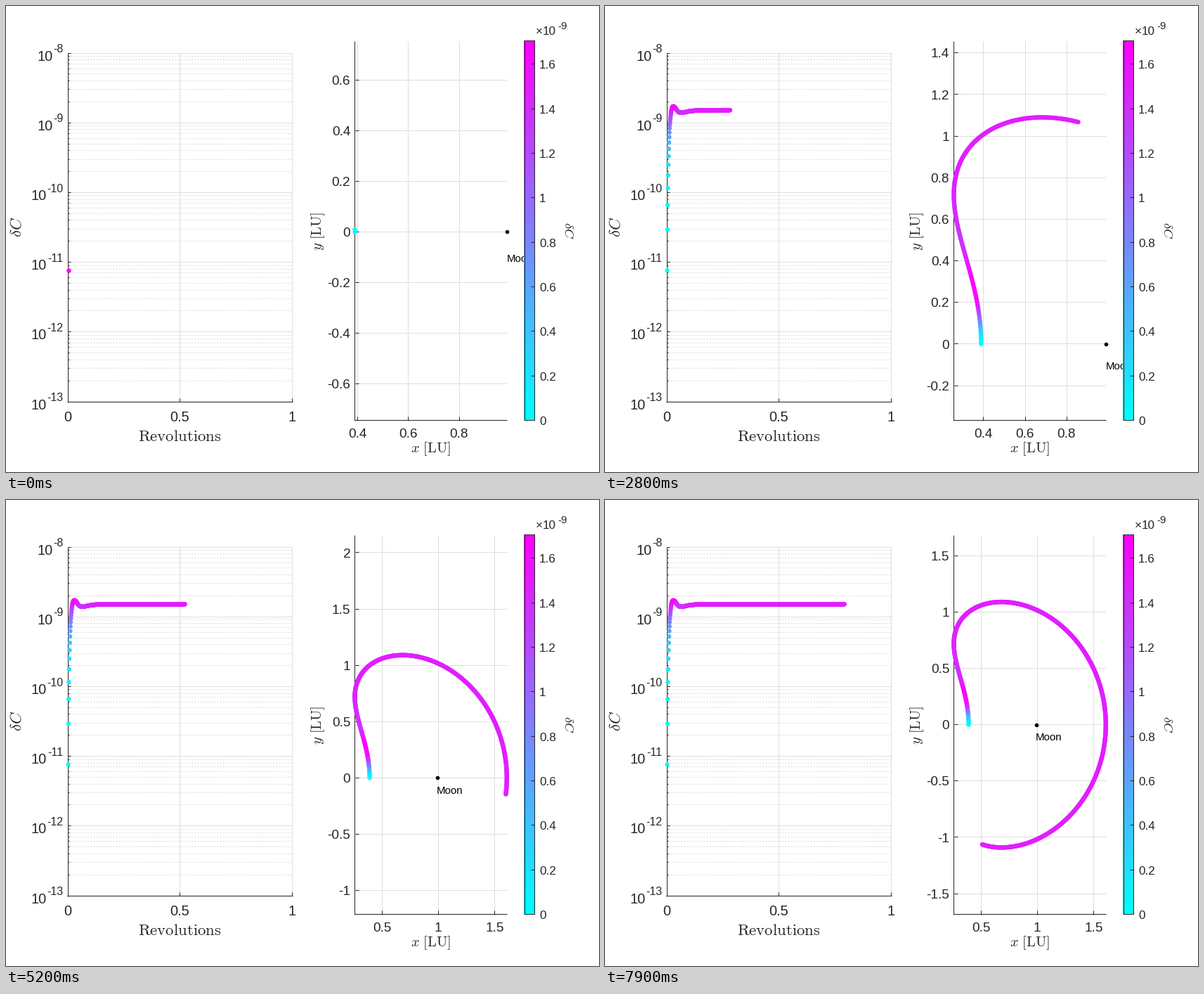
Write a matplotlib script that moves like this. It is 844 px wide and 663 px high and loops after 8000 ms.

```python
import numpy as np
import matplotlib.pyplot as plt
from matplotlib.animation import FuncAnimation
from matplotlib.collections import LineCollection
from matplotlib.patches import Rectangle

plt.rcParams["font.family"] = "Liberation Sans"
plt.rcParams["mathtext.fontset"] = "cm"

W, H, DPI = 844, 663, 72      # at 72 dpi one point is one pixel
FRAMES, PER_FRAME = 80, 10
MU = 0.01215
MOON = 1 - MU
X_START = 0.388
PEAK = 1.7056                 # largest error, in units of 1e-9
INK, GRID, MINOR = "#262626", "#dedede", "#dadada"
LEFT_FONT, RIGHT_FONT, BAR_FONT = 20, 19, 17.1

L_X0, L_X1, L_TOP, L_BOT = 88.2, 407.5, 67.0, 563.0
R_X0, R_X1, R_TOP, R_BOT = 496.5, 712.8, 50.0, 590.0


# ---- orbit: planar restricted three-body problem -------------------------

def deriv(s):
    x, y, vx, vy = s
    a = (1 - MU) / np.hypot(x + MU, y) ** 3
    b = MU / np.hypot(x - MOON, y) ** 3
    return np.array([vx, vy,
                     2 * vy + x - a * (x + MU) - b * (x - MOON),
                     -2 * vx + y - (a + b) * y])


def rk4(s, h):
    k1 = deriv(s)
    k2 = deriv(s + h / 2 * k1)
    k3 = deriv(s + h / 2 * k2)
    k4 = deriv(s + h * k3)
    return s + h / 6 * (k1 + 2 * k2 + 2 * k3 + k4)


def half_turn(v):
    """Return vx and time where the path comes back to y = 0."""
    h = 0.01
    s, t = rk4(np.array([X_START, 0, 0, v]), h), h
    while s[1] > 0 and t < 6:
        s, t = rk4(s, h), t + h
    for _ in range(3):
        dt = np.clip(-s[1] / s[3], -h, h)
        s, t = rk4(s, dt), t + dt
    return s[2], t


def periodic_start():
    """Secant search for the speed that closes the orbit."""
    v0, v1 = 1.58, 1.60
    f0, f1 = half_turn(v0)[0], half_turn(v1)[0]
    for _ in range(14):
        if abs(f1) < 1e-9 or f1 == f0:
            break
        step = np.clip(-f1 * (v1 - v0) / (f1 - f0), -0.03, 0.03)
        v0, f0, v1 = v1, f1, v1 + step
        f1 = half_turn(v1)[0]
    return v1, 2 * half_turn(v1)[1]


def orbit(count):
    v, period = periodic_start()
    s = np.array([X_START, 0, 0, v])
    path = [s[:2]]
    for _ in range(count - 1):
        s = rk4(s, period / 1000)
        path.append(s[:2])
    return np.array(path)


# ---- error curve ----------------------------------------------------------

def hermite(t, knots, vals):
    m = np.gradient(vals, knots, edge_order=2)
    i = np.clip(np.searchsorted(knots, t, side="right") - 1, 0, len(knots) - 2)
    h = knots[i + 1] - knots[i]
    u = (t - knots[i]) / h
    return ((1 + 2 * u) * (1 - u) ** 2 * vals[i] + u * (1 - u) ** 2 * h * m[i]
            + u * u * (3 - 2 * u) * vals[i + 1] + u * u * (u - 1) * h * m[i + 1])


KNOTS = np.array([0, 2, 4, 7, 10, 14, 18, 22, 25, 28, 32, 36, 44, 53, 62, 72,
                  81, 100, 125, 160, 200, 240, 1000], float)
LEVELS = np.array([0, .0292, .1147, .330, .62, 1.04, 1.385, 1.61, 1.688, 1.7056,
                   1.69, 1.647, 1.508, 1.414, 1.386, 1.395,
                   1.414, 1.455, 1.485, 1.502, 1.507, 1.507, 1.507])

COUNT = PER_FRAME * (FRAMES - 1) + 2
step_no = np.arange(COUNT)
error = hermite(step_no, KNOTS, LEVELS)
path = orbit(COUNT)


def cool(t):
    t = np.clip(t, 0, 1)
    return np.column_stack([t, 1 - t, np.ones_like(t)])


def log_y(v):
    """Pixel row of an error given in units of 1e-9."""
    return L_TOP - (np.log10(v) - 1) * (L_BOT - L_TOP) / 5


# ---- stage ----------------------------------------------------------------

fig = plt.figure(figsize=((W + 1e-6) / DPI, (H + 1e-6) / DPI), dpi=DPI,
                 facecolor="white")
ax = fig.add_axes([0, 0, 1, 1])
ax.axis("off")


def hline(x0, x1, y):
    return [(x0, np.floor(y) + .5), (x1, np.floor(y) + .5)]


def vline(x, y0, y1):
    return [(np.floor(x) - .5, y0), (np.floor(x) - .5, y1)]


def strokes(segs, color, z, style="solid"):
    lines = LineCollection(segs, colors=color, linewidths=1, linestyles=style,
                           zorder=z)
    ax.add_collection(lines, autolim=False)
    return lines


def label(x, y, s, size, ha="center", z=3, color=INK, rot=0):
    return ax.text(x, y, s, size=size, ha=ha, va="baseline", color=color,
                   rotation=rot, rotation_mode="anchor", zorder=z)


def dots(size, z, **kw):
    return ax.scatter([], [], s=size ** 2, linewidths=0, zorder=z, **kw)


def left_panel():
    major, minor = [], []
    axis = [vline(L_X0, L_TOP, L_BOT + 1), hline(L_X0 - 1, L_X1, L_BOT)]
    for i, name in enumerate(("0", "0.5", "1")):
        x = L_X0 + i * (L_X1 - L_X0) / 2
        major.append(vline(x, L_TOP, L_BOT))
        axis.append(vline(x, L_BOT - 5, L_BOT))
        label(x - .4, 591, name, LEFT_FONT)
    for p in range(-13, -7):
        y = log_y(10.0 ** (p + 9))
        major.append(hline(L_X0, L_X1, y))
        axis.append(hline(L_X0, L_X0 + 4, y))
        sup = .8 * LEFT_FONT
        label(81.3, y - .8, str(p), sup, "right")
        width = sup * (.333 + .556 * len(str(-p)))
        label(80.6 - width, y + 10.5, "10", LEFT_FONT, "right")
        if p < -8:
            for m in range(2, 10):
                ym = log_y(m * 10.0 ** (p + 9))
                minor.append(hline(L_X0, L_X1, ym))
                axis.append(hline(L_X0, L_X0 + 2, ym))
    minor.append(hline(L_X0, L_X1, log_y(.01)))
    strokes(minor, MINOR, 1, (0, (2, 2)))
    strokes(major, GRID, 1)
    strokes(axis, INK, 2)
    label(247.6, 618.8, r"$\mathrm{Revolutions}$", 22.8)
    label(21, 314.5, r"$\delta C$", 22.8, rot=90)


def color_bar():
    ramp = cool(np.linspace(1, 0, 256))[:, None, :]
    ax.imshow(ramp, extent=(737, 752, R_BOT, R_TOP), aspect="auto", zorder=6)
    ax.add_patch(Rectangle((737.5, 49.5), 14, 540, fill=False, ec=INK, lw=1,
                           zorder=7))
    ticks = []
    for i in range(9):
        y = R_BOT - i * .2 / PEAK * (R_BOT - R_TOP)
        ticks.append(hline(746.5, 751.5, y - .5))
        label(759.2, y + 6, f"{round(i * .2, 1):g}", BAR_FONT, "left")
    strokes(ticks, INK, 7)
    label(754, 40.5, "\u00d7", BAR_FONT, "left")
    label(763.5, 40.5, "10", BAR_FONT, "left")
    label(798.3, 33, "-9", 15, "right")
    label(794.5, 319.5, r"$\delta C$", 18.8, rot=270)


left_panel()
color_bar()

label(604.4, 635.5, r"$x\ \mathrm{[LU]}$", 20.5)
label(449, 320, r"$y\ \mathrm{[LU]}$", 20.5, rot=90)
strokes([vline(R_X0, R_TOP, R_BOT), hline(R_X0 - 1, R_X1, R_BOT - 1)], INK, 2)
grid = strokes([], GRID, 1)
ticks = strokes([], INK, 2)
x_names = [label(0, 613.5, "", RIGHT_FONT) for _ in range(8)]
y_names = [label(490.2, 0, "", RIGHT_FONT, "right") for _ in range(14)]

curve = dots(6.4, 4)
track = dots(6.4, 4)
moon = dots(5.6, 5, color="black")
moon_name = label(0, 0, "Moon", 15, "left", 5, "black")

ax.set_xlim(0, W)
ax.set_ylim(H, 0)


def tick_values(lo, hi, step):
    return np.arange(np.ceil(lo / step), np.floor(hi / step) + 1) * step


def name_ticks(texts, values, place):
    for i, t in enumerate(texts):
        shown = i < len(values)
        t.set_visible(shown)
        if shown:
            t.set_text(f"{round(values[i], 1) + 0.0:g}")
            place(t, values[i])


def draw(n):
    end = PER_FRAME * n + 2
    pts, err = path[:end], error[:end]

    # log plot: the first sample is zero and stays hidden
    x = L_X0 + step_no[1:end] / 1000 * (L_X1 - L_X0)
    curve.set_offsets(np.column_stack([x, log_y(err[1:]) - .3]))
    curve.set_facecolor(cool(err[1:] / err.max()))

    # equal-scale view that is tight in x and centred in y
    x_lo, x_hi = pts[:, 0].min(), max(pts[:, 0].max(), MOON)
    scale = (R_X1 - R_X0) / (x_hi - x_lo)
    y_mid = (pts[:, 1].min() + pts[:, 1].max()) / 2
    span = (R_BOT - R_TOP) / scale

    def px(v):
        return R_X0 + (v - x_lo) * scale

    def py(v):
        return (R_TOP + R_BOT) / 2 - .3 - (v - y_mid) * scale

    track.set_offsets(np.column_stack([px(pts[:, 0]), py(pts[:, 1])]))
    track.set_facecolor(cool(err / PEAK))
    moon.set_offsets([(px(MOON), py(0))])
    moon_name.set_position((px(MOON) - .4, py(-.1) + 6.2))

    xs = tick_values(x_lo, x_hi, .2 if x_hi - x_lo < 1.25 else .5)
    ys = tick_values(y_mid - span / 2, y_mid + span / 2,
                     .2 if span < 2.2 else .5)
    grid.set_segments([vline(px(v), R_TOP, R_BOT) for v in xs]
                      + [hline(R_X0, R_X1, py(v)) for v in ys])
    ticks.set_segments([vline(px(v), R_BOT - 5.5, R_BOT) for v in xs]
                       + [hline(R_X0, R_X0 + 5, py(v)) for v in ys])
    name_ticks(x_names, xs, lambda t, v: t.set_x(px(v) - .5))
    name_ticks(y_names, ys, lambda t, v: t.set_y(py(v) + 6.6))
    return []


anim = FuncAnimation(fig, draw, frames=FRAMES, interval=100, repeat=True,
                     init_func=lambda: draw(0), cache_frame_data=False)
plt.show()
```
